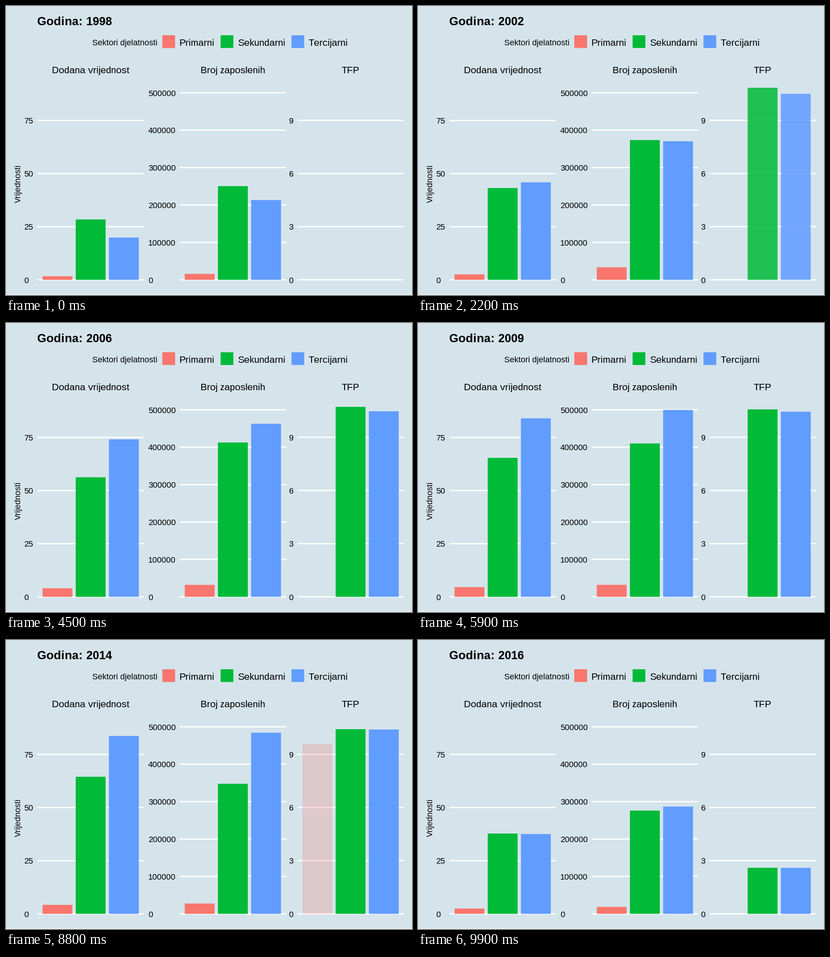
Animation of 885 by 632 pixels, one loop 10000 ms. Source, as a matplotlib script:

```python
import matplotlib.pyplot as plt
import numpy as np
from matplotlib.animation import FuncAnimation
from matplotlib.patches import Rectangle

W, H, DPI = 885, 632, 100
BASE = 598.8                      # y of the zero line
PANEL_W = 231.5
UNIT = PANEL_W / 3.2              # width of one category slot
COLORS = ["#F8766D", "#00BA38", "#619CFF"]
YEARS = np.arange(1998, 2017)
KEY_YEARS = [1998, 2000, 2002, 2006, 2008, 2010, 2014, 2016]

# Whole-pixel glyph advances without kerning
plt.rcParams.update({
    "font.family": "Liberation Sans",
    "text.hinting": "native",
    "text.hinting_factor": 1,
    "text.kerning_factor": 6,
})


def trend(*values):
    """Yearly values along straight lines between the key years."""
    return np.interp(YEARS, KEY_YEARS, values)


def only(years, values):
    """Keep the values of the given years and leave gaps elsewhere."""
    return np.where(years, values, np.nan)


value_added = [
    trend(1.7, 1.7, 2.65, 4.0, 4.85, 4.1, 4.15, 4.8),
    trend(28.4, 34.3, 43.9, 56.25, 67, 62.7, 64.3, 65.9),
    trend(19.9, 29.4, 47.2, 74.1, 87, 79, 82.7, 90.5),
]
employees = [                     # in thousands
    trend(15.9, 28.3, 34, 32, 33, 30.6, 27.7, 26.4),
    trend(250.5, 342.9, 376, 412.6, 434, 370, 347, 352.5),
    trend(213.3, 299.5, 376, 462.7, 515, 474, 481, 507),
]
tfp = [
    only(YEARS == 2015, 9.59),
    only(YEARS >= 2002, np.interp(YEARS, [2002, 2006, 2011, 2016],
                                  [10.84, 10.72, 10.46, 10.4])),
    only(YEARS >= 2002, 10.5 - 0.008 * (YEARS - 2002)),
]

# name, left edge, label x, pixels per unit, grid step, grid lines, label factor, data
PANELS = [
    ("Dodana vrijednost", 68.8, 39, 4.647, 25, 4, 1, value_added),
    ("Broj zaposlenih", 378.8, 310, 0.818, 100, 6, 1000, employees),
    ("TFP", 635.4, 616, 38.75, 3, 4, 1, tfp),
]

fig = plt.figure(figsize=(W / DPI, H / DPI), dpi=DPI, facecolor="#D5E4EB")
ax = fig.add_axes([0, 0, 1, 1])
ax.set_xlim(0, W)
ax.set_ylim(H, 0)
ax.axis("off")


def text(x, y, s, px, **kw):
    return ax.text(x, y, s, fontsize=px * 72 / DPI, color="black",
                   va="baseline", **kw)


def rect(x, y, w, h, color, z=1):
    return ax.add_patch(Rectangle((x, y), w, h, fc=color, lw=0, zorder=z,
                                  snap=False))


def draw_legend():
    text(188, 85.5, "Sektori djelatnosti", 18)
    entries = [("Primarni", 340.8, 377), ("Sekundarni", 467.8, 505),
               ("Tercijarni", 622.3, 660)]
    for (label, key_x, label_x), color in zip(entries, COLORS):
        rect(key_x, 64, 27.8, 27.8, color)
        text(label_x, 87, label, 21)


def draw_panel(name, left, label_x, scale, step, lines, factor, data):
    text(left + PANEL_W / 2, 147, name, 21, ha="center")
    for k in range(lines):
        y = BASE - k * step * scale
        rect(left, y - 1.4, PANEL_W, 2.8, "white")
        text(label_x, y + 6.8, str(k * step * factor), 18)
    return [rect(left + (0.15 + j) * UNIT, BASE, 0.9 * UNIT, 0, c, 2)
            for j, c in enumerate(COLORS)]


rect(0, 631, W, 1, "white")
title = text(68, 42, "", 26, weight="bold")
text(32, 388.5, "Vrijednosti", 18, rotation=90, ha="center",
     rotation_mode="anchor")
draw_legend()
bars = [bar for p in PANELS for bar in draw_panel(*p)]
heights = np.array([series * p[3] for p in PANELS for series in p[7]])

# First frame and step count of every transition
MOVES = [(2 + 6 * i, 4) for i in range(6)] + [(38 + 5 * i, 3) for i in range(13)]


def ease(t):
    return (1 - np.cos(np.pi * t)) / 2


def state(frame):
    """Return the old state, the new state and linear progress."""
    done = sum(start <= frame for start, _ in MOVES)
    if done == 0:
        return 0, 0, 1.0
    start, steps = MOVES[done - 1]
    return done - 1, done % len(YEARS), min(1.0, (frame - start + 1) / steps)


def update(frame):
    old, new, t = state(frame)
    e = ease(t)
    for bar, a, b in zip(bars, heights[:, old], heights[:, new]):
        alpha = 1
        if np.isnan(a) and np.isnan(b):
            h = 0
        elif np.isnan(a):         # enter by fading in
            h, alpha = b, e
        elif np.isnan(b):         # exit by shrinking to the base
            h = a * (1 - e)
        else:
            h = a + (b - a) * e
        bar.set_y(BASE - h)
        bar.set_height(h)
        bar.set_alpha(alpha)
        bar.set_visible(h > 0.01)
    # The last year holds until the loop restarts
    shown = new if t >= 0.5 and new >= old else old
    title.set_text(f"Godina: {YEARS[shown]}")
    return [*bars, title]


anim = FuncAnimation(fig, update, frames=100, interval=100, repeat=True,
                     repeat_delay=0, blit=False)
plt.show()
```
